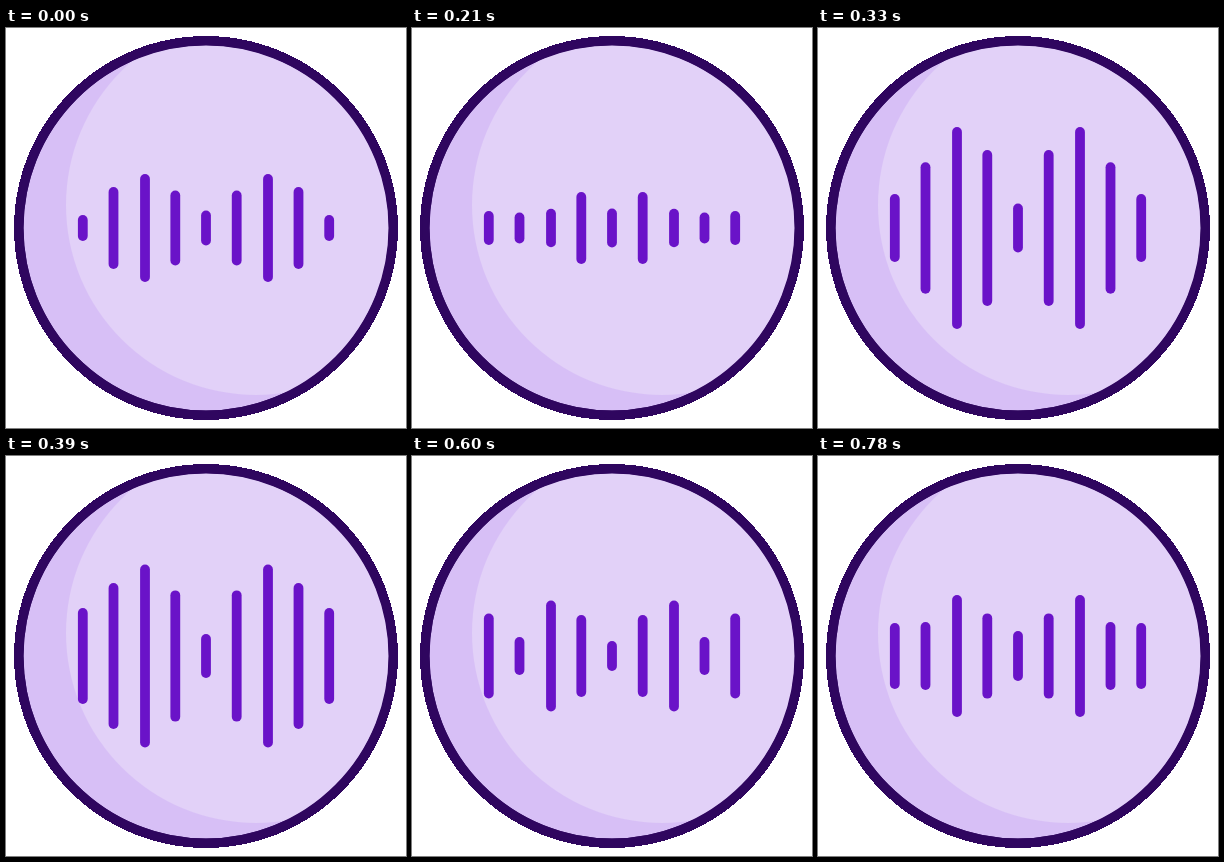
Animation, 400 px wide and 400 px high, one loop 810 ms. Source, as an HTML page without scripts:

```html
<!DOCTYPE html>
<html lang="en">
<head>
<meta charset="utf-8">
<title>Sound wave</title>
<style>
  html, body { margin: 0; width: 100%; height: 100%; overflow: hidden; background: #fff; }
  svg { display: block; width: 100vw; height: 100vh; }

  /* --a to --h: half heights of a bar at successive poses */
  .b1 { --a: 13px; --b: 20.2px; --c: 17px; --d: 34px; --e: 48px; --f: 69px; --g: 42.5px; --h: 33px; }
  .b2 { --a: 41px; --b: 52px; --c: 15.5px; --d: 65.7px; --e: 73px; --f: 67.5px; --g: 19px; --h: 34px; }
  .b3 { --a: 54px; --b: 45.3px; --c: 19.3px; --d: 101px; --e: 91.4px; --f: 77px; --g: 55.5px; --h: 61px; }
  .b4 { --a: 37.5px; --b: 29.5px; --c: 36px; --d: 78px; --e: 65.6px; --f: 47px; --g: 41px; --h: 42.6px; }
  .b5 { --a: 17.5px; --b: 14.6px; --c: 19.5px; --d: 24.5px; --e: 21.9px; --f: 18.2px; --g: 15px; --h: 25px; }

  rect {
    width: 9.8px;
    x: -4.9px;
    rx: 4.9px;
    fill: #6a13c8;
    animation: pulse 810ms infinite;
  }

  /* one step every 30 ms */
  @keyframes pulse {
    0%      { y: calc(-1 * var(--a)); height: calc(2 * var(--a)); animation-timing-function: steps(3); }
    11.111% { y: calc(-1 * var(--b)); height: calc(2 * var(--b)); animation-timing-function: steps(4); }
    25.925% { y: calc(-1 * var(--c)); height: calc(2 * var(--c)); animation-timing-function: steps(4); }
    40.74%  { y: calc(-1 * var(--d)); height: calc(2 * var(--d)); animation-timing-function: steps(2); }
    48.148% { y: calc(-1 * var(--e)); height: calc(2 * var(--e)); animation-timing-function: steps(3); }
    59.259% { y: calc(-1 * var(--f)); height: calc(2 * var(--f)); animation-timing-function: steps(4); }
    74.074% { y: calc(-1 * var(--g)); height: calc(2 * var(--g)); animation-timing-function: steps(6); }
    96.296%, 100% { y: calc(-1 * var(--h)); height: calc(2 * var(--h)); }
  }
</style>
</head>
<body>
<svg viewBox="0 0 400 400">
  <clipPath id="disc"><circle cx="200" cy="200" r="183"/></clipPath>
  <circle cx="200" cy="200" r="192" fill="#2f065f" shape-rendering="crispEdges"/>
  <circle cx="200" cy="200" r="182.5" fill="#d7bff6"/>
  <g clip-path="url(#disc)">
    <circle cx="250" cy="177" r="190" fill="#e2d1f8"/>
  </g>
  <circle cx="200" cy="200" r="186" fill="none" stroke="#2f065f" stroke-width="7"/>
  <g transform="translate(200 200)">
    <g transform="translate(-123.2)"><rect class="b1"/></g>
    <g transform="translate(-92.5)"><rect class="b2"/></g>
    <g transform="translate(-61)"><rect class="b3"/></g>
    <g transform="translate(-30.7)"><rect class="b4"/></g>
    <rect class="b5"/>
    <g transform="translate(30.7)"><rect class="b4"/></g>
    <g transform="translate(62)"><rect class="b3"/></g>
    <g transform="translate(92.5)"><rect class="b2"/></g>
    <g transform="translate(123.2)"><rect class="b1"/></g>
  </g>
</svg>
</body>
</html>
```
